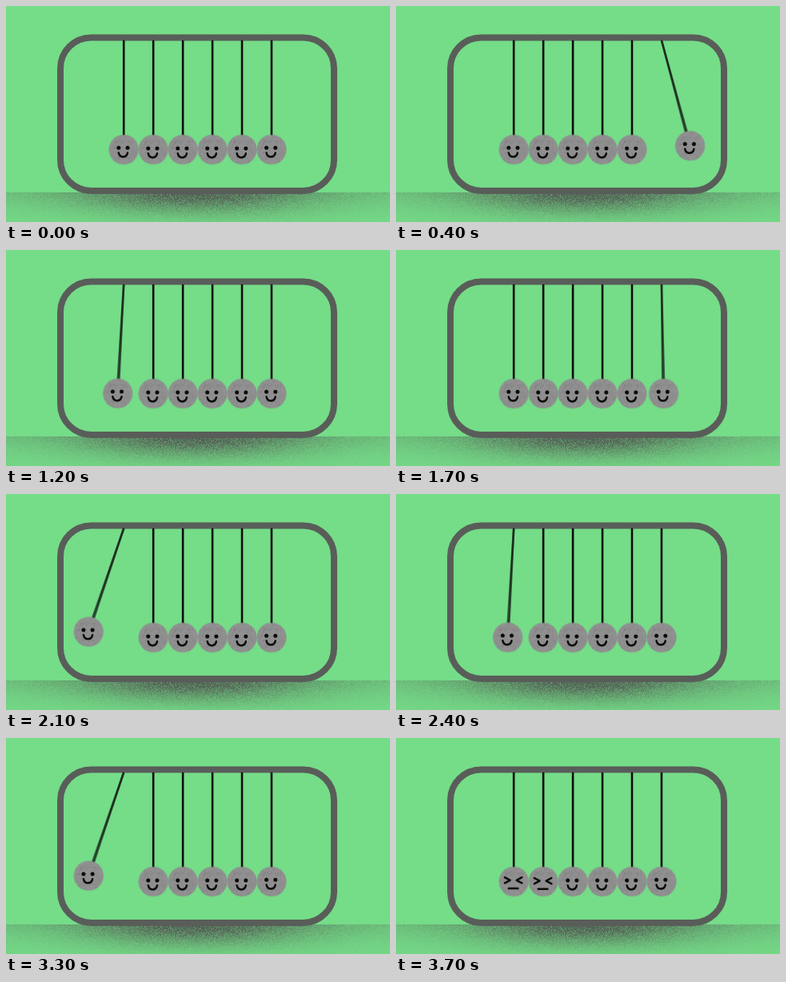
Animation, 480 px wide and 270 px high, one loop 3.8 s. Source, as an HTML page with a canvas:

```html
<!DOCTYPE html>
<html lang="en">
<head>
<meta charset="utf-8">
<title>Cradle</title>
<style>
html, body { margin: 0; width: 100%; height: 100%; overflow: hidden; background: #75dc88; }
canvas { display: block; width: 480px; height: 270px; }
</style>
</head>
<body>
<canvas id="stage" width="480" height="270"></canvas>
<script>
const W = 480, H = 270, LOOP = 3800, STEP = 100, PERIOD = 1200;
const TOP = 43, LEN = 136.5, R = 18.6, FIRST = 147.2, GAP = 36.95, COUNT = 6;
const INK = '#0b0b0b';
const ctx = document.getElementById('stage').getContext('2d');

let seed = 7;
function rnd() {
  seed = (seed * 1664525 + 1013904223) >>> 0;
  return seed / 4294967296;
}

function layer(w, h, draw) {
  const c = document.createElement('canvas');
  c.width = w;
  c.height = h;
  draw(c.getContext('2d'));
  return c;
}

const scene = layer(W, H, g => {
  g.fillStyle = '#75dc88';
  g.fillRect(0, 0, W, H);

  // Grainy shadow under the frame, fading outwards and down
  const floor = 233;
  for (let y = floor; y < H; y++) {
    const dy = y - floor;
    for (let x = 0; x < W; x++) {
      const pool = Math.exp(-(((x - 238) / 140) ** 2) - (dy / 25) ** 2);
      const shade = 0.72 * pool + 0.2 * Math.exp(-dy / 20);
      g.fillStyle = `rgba(82,90,83,${shade * (0.65 + 0.7 * rnd())})`;
      g.fillRect(x, y, 1, 1);
    }
  }

  g.strokeStyle = '#595d59';
  g.lineWidth = 8;
  g.beginPath();
  g.roundRect(68, 39.4, 342, 191.5, 38.5);
  g.stroke();
});

const ball = layer(40, 40, g => {
  g.beginPath();
  g.arc(20, 20, R, 0, 7);
  g.fillStyle = '#909090';
  g.fill();
  g.clip();
  for (let i = 0; i < 500; i++) {
    g.fillStyle = rnd() < 0.5 ? 'rgba(110,110,110,.35)' : 'rgba(165,165,165,.3)';
    g.fillRect(rnd() * 40, rnd() * 40, 1, 1);
  }
});

function line(...pts) {
  ctx.beginPath();
  for (let i = 0; i < pts.length; i += 2) ctx.lineTo(pts[i], pts[i + 1]);
  ctx.stroke();
}

function smile() {
  ctx.fillStyle = INK;
  for (const x of [-5.6, 5.6]) {
    ctx.beginPath();
    ctx.arc(x, -1.4, 2.5, 0, 7);
    ctx.fill();
  }
  ctx.beginPath();
  ctx.moveTo(-5.6, 4.8);
  ctx.bezierCurveTo(-4.4, 11.6, 4.4, 11.6, 5.6, 4.8);
  ctx.stroke();
}

function squint() {
  line(-10.5, -4.5, -3.8, -0.8, -10.5, 2.6);
  line(11, -4.5, 4.3, -0.8, 11, 2.6);
  line(-5.5, 9.2, 6, 9.2);
}

function string(angle, alpha) {
  ctx.save();
  ctx.rotate(angle);
  ctx.globalAlpha = alpha;
  ctx.lineWidth = 2.6;
  line(0, 0, 0, LEN - R + 1);
  ctx.restore();
}

function pendulum(i, angle, hurt) {
  const outer = i === 0 || i === COUNT - 1;
  ctx.save();
  ctx.translate(FIRST + i * GAP, TOP);
  ctx.strokeStyle = INK;
  ctx.lineCap = 'butt';
  if (angle) {
    // blurred by its motion
    string(angle - 0.006, 0.6);
    string(angle + 0.008, 0.6);
  } else {
    string(0, 1);
  }
  ctx.translate(-LEN * Math.sin(angle), LEN * Math.cos(angle));
  ctx.drawImage(ball, -20, -20);
  ctx.translate(-0.8, outer ? -0.8 : 0);
  ctx.lineWidth = 2.5;
  ctx.lineCap = 'round';
  ctx.lineJoin = 'round';
  if (hurt) squint(); else smile();
  ctx.restore();
}

// Angle of a swing that leaves rest at a and is back at b
function swing(p, a, b) {
  return p > a && p < b ? Math.asin(48.5 * Math.sin(Math.PI * (p - a) / (b - a)) / LEN) : 0;
}

function draw(time) {
  const t = Math.floor(time % LOOP / STEP) * STEP;
  const p = t % PERIOD || (t ? PERIOD : 0);
  const left = swing(p, 717, 1225);
  const right = -swing(p, 100, 507);
  const hurtLeft = p >= 100 && p < 300;
  const hurtRight = p >= 700 && p < 900;

  ctx.drawImage(scene, 0, 0);
  for (let i = 0; i < COUNT; i++) {
    const angle = i === 0 ? left : i === COUNT - 1 ? right : 0;
    pendulum(i, angle, i < 2 ? hurtLeft : i >= COUNT - 2 && hurtRight);
  }
}

const start = performance.now();
function tick() {
  draw(performance.now() - start);
  requestAnimationFrame(tick);
}
tick();
</script>
</body>
</html>
```
